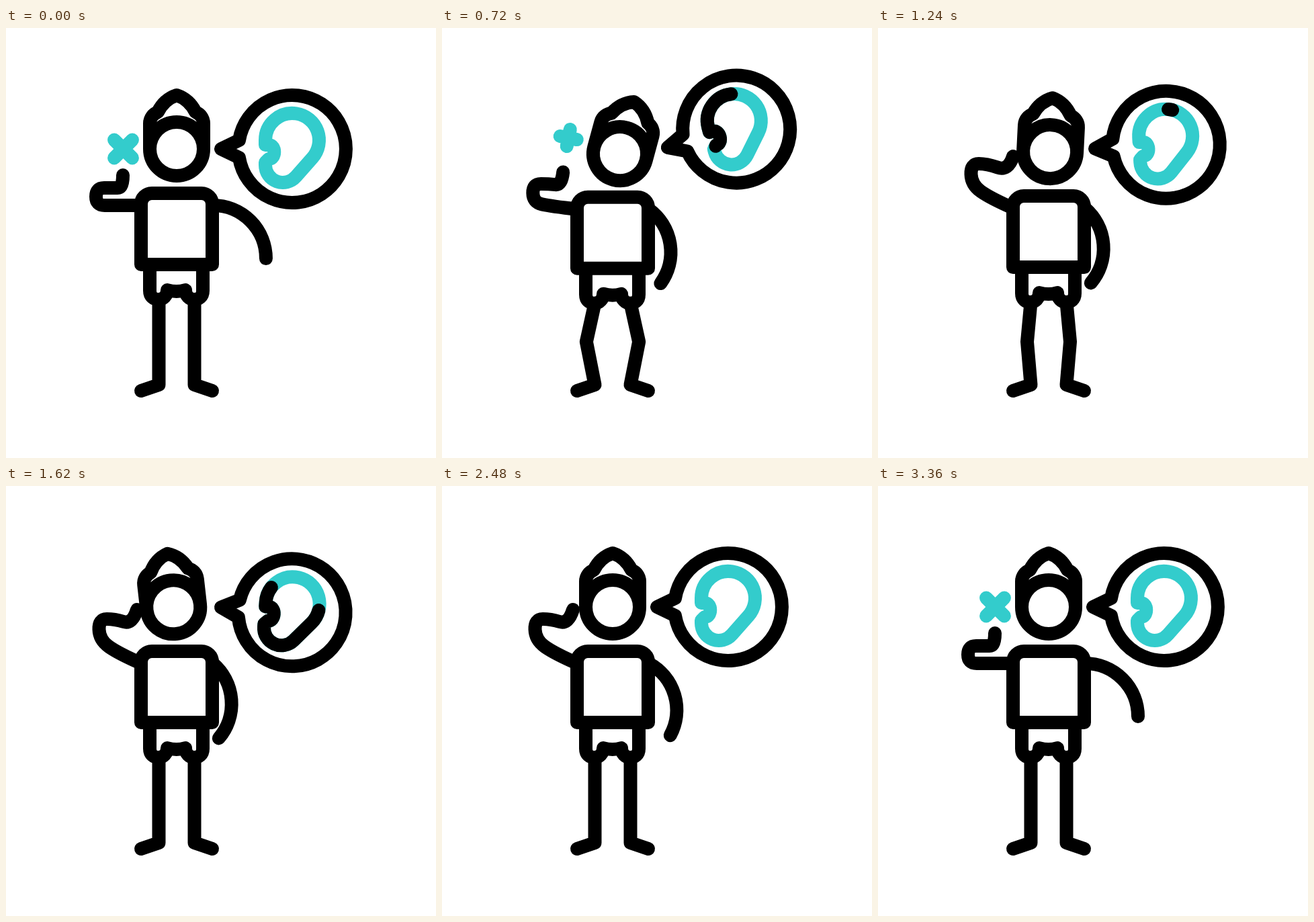
An HTML page with a canvas for the animation above (3600 ms loop, 640x640 px).

```html
<!DOCTYPE html>
<html lang="en">
<head>
<meta charset="utf-8">
<title>Ear check</title>
<style>
  html, body { margin: 0; width: 100%; height: 100%; overflow: hidden; background: #fff; }
  canvas { display: block; width: 100vmin; height: 100vmin; }
</style>
</head>
<body>
<canvas id="stage" width="640" height="640"></canvas>
<script>
const LOOP = 3600;
const INK = '#000';
const TEAL = '#33cccc';
const ctx = document.getElementById('stage').getContext('2d');

const linear = (t, from, to) => Math.min(1, Math.max(0, (t - from) / (to - from)));
const ease = (t, from, to) => {
  const u = linear(t, from, to);
  return u * u * (3 - 2 * u);
};

// Everything that moves, as sums of eased moves.
function poseAt(t) {
  const e = (from, to) => ease(t, from, to);
  const cross = e(0, 1150) - e(2640, 3360);
  return {
    sink: 6.3 * (e(120, 860) - e(1000, 1600)),
    knee: 13 * (e(0, 800) - e(800, 1600)),
    headTilt: 15.6 * e(0, 800) - 22.1 * e(800, 1600) + 6.5 * e(1600, 2140),
    bubbleX: 17 * (e(0, 600) - e(600, 1480)),
    bubbleTilt: -20 * e(0, 580) + 10 * e(560, 880) + 14.3 * e(900, 1600)
      - 6.8 * e(1600, 1900) + 2.5 * e(1900, 2150),
    rightArm: 40.5 * (linear(t, 0, 810) - linear(t, 2160, 3240)),
    raise: e(520, 1080) - e(2640, 3340),
    reach: 6 * (e(850, 1240) - e(1240, 1600)),
    crossX: 174.5 + 20 * cross,
    crossY: 180 - 24 * cross,
    crossTurn: 45 - 180 * cross,
    crossArm: 19 * (1 - e(500, 1080) + e(2700, 3260))
  };
}

const headShape = new Path2D(`M294 180 A40 40 0 1 1 214 180 A40 40 0 1 1 294 180 V142
  C294 134 289 128 282 125 C276 113 266 104 254 100
  C242 104 232 113 226 125 C219 128 214 134 214 142 V180`);
const torso = new Path2D('M201 352 V262 A16 16 0 0 1 217 246 H291 A16 16 0 0 1 307 262 V352 Z');
const shorts = new Path2D(`M214 356 V391 C214 400 220 404 227 404 C234 404 240 398 240 390
  Q254 394 267 390 C267 398 273 404 280 404 C287 404 293 400 293 391 V356`);
const bubble = new Path2D('M347 167 A80 80 0 1 1 347 193 L320 180 Z');
const rightArm = new Path2D('M308 264 A79 79 0 0 1 387 343');
const earData = `M432 127.4 A40 40 0 0 0 386 167 V174 H391 C402 174 402 195 391 195
  L386 200 V204 A26 26 0 0 0 431.5 221.2 L456 193.4 A40 40 0 0 0 432 127.4 Z`;
const ear = new Path2D(earData);
const earMeter = document.createElementNS('http://www.w3.org/2000/svg', 'path');
earMeter.setAttribute('d', earData);
const earLength = earMeter.getTotalLength();

// Control points from shoulder to hand.
const armDown = [[201, 264], [160, 264], [134, 264], [134, 238], [158, 238], [174, 238], [174, 219]];
const armRaised = [[201, 264], [167, 249], [139, 229], [138, 198], [162, 198], [188, 206], [195, 184]];

function stroke(path, color = INK) {
  ctx.strokeStyle = color;
  ctx.stroke(path);
}

function polyline(...points) {
  const path = new Path2D();
  points.forEach(([x, y]) => path.lineTo(x, y));
  stroke(path);
}

// Rounds off a control polygon through the midpoints of its sides.
function smoothLine(points) {
  const path = new Path2D();
  const last = points.length - 1;
  path.moveTo(...points[0]);
  for (let i = 1; i < last; i++) {
    const [x, y] = points[i], [nx, ny] = points[i + 1];
    if (i === last - 1) path.quadraticCurveTo(x, y, nx, ny);
    else path.quadraticCurveTo(x, y, (x + nx) / 2, (y + ny) / 2);
  }
  stroke(path);
}

function turned(x, y, degrees, draw) {
  ctx.save();
  ctx.translate(x, y);
  ctx.rotate(degrees * Math.PI / 180);
  ctx.translate(-x, -y);
  draw();
  ctx.restore();
}

function drawLeftArm(raise, reach) {
  smoothLine(armDown.map(([x, y], i) => {
    const [rx, ry] = armRaised[i];
    const pull = i > 4 ? reach : 0;
    return [x + (rx - x) * raise + pull, y + (ry - y) * raise + pull / 2];
  }));
}

function drawLegs(sink, knee) {
  for (const side of [-1, 1]) {
    const x = 254 + side * 26.5;
    polyline([x, 404 + sink], [x + side * knee, 467], [x, 531], [254 + side * 53, 540]);
  }
}

function drawCross(x, y, degrees, arm) {
  if (arm < 0.2) return;
  turned(x, y, degrees, () => {
    stroke(new Path2D(`M${x - arm} ${y} H${x + arm} M${x} ${y - arm} V${y + arm}`), TEAL);
  });
}

// Twice, a black line runs once round the ear.
function drawEar(t) {
  stroke(ear, TEAL);
  for (const begin of [500, 1240]) {
    const head = ease(t, begin, begin + 540) * earLength;
    const tail = ease(t, begin + 250, begin + 790) * earLength;
    if (head - tail < 0.2) continue;
    ctx.save();
    ctx.setLineDash([head - tail, earLength * 2]);
    ctx.lineDashOffset = -tail;
    stroke(ear);
    ctx.restore();
  }
}

function draw(t) {
  const pose = poseAt(t);

  ctx.fillStyle = '#fff';
  ctx.fillRect(0, 0, 640, 640);
  ctx.lineWidth = 20;
  ctx.lineCap = ctx.lineJoin = 'round';

  drawCross(pose.crossX, pose.crossY, pose.crossTurn, pose.crossArm);
  drawLegs(pose.sink, pose.knee);

  ctx.save();
  ctx.translate(0, pose.sink);
  stroke(shorts);
  stroke(torso);
  drawLeftArm(pose.raise, pose.reach);
  turned(308, 264, pose.rightArm, () => stroke(rightArm));
  turned(254, 222, pose.headTilt, () => stroke(headShape));
  ctx.restore();

  ctx.save();
  ctx.translate(pose.bubbleX, 0);
  turned(312, 180, pose.bubbleTilt, () => {
    stroke(bubble);
    drawEar(t);
  });
  ctx.restore();
}

const start = performance.now();
function tick() {
  draw((performance.now() - start) % LOOP);
  requestAnimationFrame(tick);
}
tick();
</script>
</body>
</html>
```
